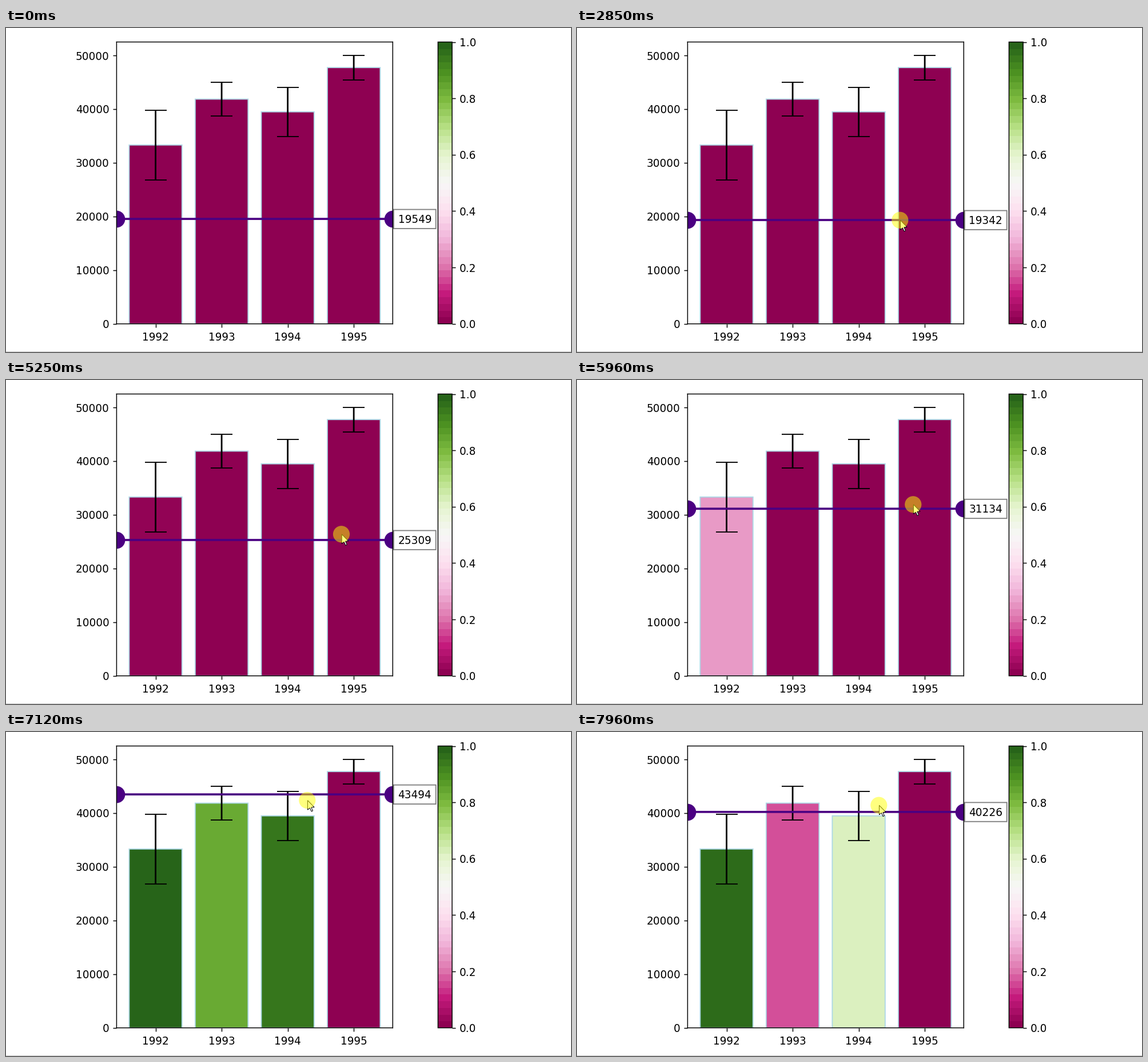
Write a matplotlib script that moves like this. It is 988 px wide and 567 px high and loops after 8 s.

```python
import math

import matplotlib.pyplot as plt
import numpy as np
from matplotlib.animation import FuncAnimation
from matplotlib.cm import ScalarMappable
from matplotlib.patches import Circle, Polygon, Rectangle

W, H, DPI = 988, 567, 128
LOOP, STEP = 8000, 40
PT = 133.4 / DPI  # the chart is drawn at 133.4 dots per inch
PX = 72 / DPI
LEFT, RIGHT, TOP, BOTTOM = 193.4, 676.3, 24.5, 517.7
BAR_LEFT, BAR_RIGHT = 755.4, 780.1
PRESS, LAG, FIRST_VALUE = 2390, 110, 19549

plt.rcParams.update({
    "font.family": "DejaVu Sans",
    "font.size": 10 * PT,
    "axes.linewidth": 0.8 * PT,
    "path.snap": False,
    "toolbar": "None",
})
for axis, pad in (("xtick", 4.1), ("ytick", 3.5)):
    plt.rcParams[f"{axis}.major.width"] = 0.8 * PT
    plt.rcParams[f"{axis}.major.size"] = 3.5 * PT
    plt.rcParams[f"{axis}.major.pad"] = pad * PT

rng = np.random.RandomState(12345)
samples = np.array([rng.normal(mean, spread, 3650) for mean, spread in
                    ((32000, 2e5), (43000, 1e5), (43500, 1.4e5), (48000, 7e4))])
MEANS = samples.mean(axis=1)
SIGMAS = samples.std(axis=1, ddof=1) / math.sqrt(samples.shape[1])
ERRORS = 1.96 * SIGMAS
Y_MAX = 1.05 * (MEANS + ERRORS).max()
GRID = Y_MAX / 369.6  # value of one mouse pixel
PER_PIXEL = Y_MAX / (BOTTOM - TOP)

# turning points: time in ms, x, y, ease-out power of the way there
TURNS = [
    (130, 946, 236, 1), (540, 730, 512, 1), (930, 562, 335, 1),
    (1100, 557, 309, 1), (1340, 566, 335, 1), (1910, 564.5, 332, 1),
    (2640, 564.5, 332, 1), (2840, 564.5, 336, 4), (4060, 560, 376, 1),
    (4560, 585, 323.5, 2), (4760, 584, 362, 2), (5150, 586, 276, 1),
    (5960, 587.5, 217.5, 1), (6775, 517.6, 74, 2), (7390, 528.6, 130, 2),
    (7700, 527.5, 164, 2), (8150, 527.5, 120, 2),
]
ARROW = np.array([(0, 0), (0, 16.5), (3.8, 13), (6.6, 19.3),
                  (9, 18.2), (6.3, 12), (11.6, 12)])


def pointer_at(t):
    for (t0, *start, _), (t1, *end, power) in zip(TURNS, TURNS[1:]):
        if t < t1:
            break
    rest = (1 - np.clip((t - t0) / (t1 - t0), 0, 1)) ** power
    return np.array(end) + (np.array(start) - end) * rest


def threshold_at(t):
    """The line trails the pressed pointer in whole mouse pixels."""
    if t < PRESS:
        return FIRST_VALUE
    value = (BOTTOM - pointer_at(t - LAG)[1]) * PER_PIXEL
    return (round(value / GRID - 0.15) + 0.15) * GRID


def below(value, mean, sigma):
    """Probability that the mean lies below the threshold."""
    return 0.5 * (1 + math.erf((value - mean) / (sigma * math.sqrt(2))))


def pixel_axes(left, right):
    return fig.add_axes([left / W, 1 - BOTTOM / H,
                         (right - left) / W, (BOTTOM - TOP) / H])


fig = plt.figure(figsize=(W / DPI, H / DPI), dpi=DPI, facecolor="white")
cmap = plt.get_cmap("PiYG")

ax = pixel_axes(LEFT, RIGHT)
bars = ax.bar(range(4), MEANS, width=0.8, edgecolor="lightblue", linewidth=PT)
ax.errorbar(range(4), MEANS, yerr=ERRORS, fmt="none", ecolor="black",
            elinewidth=1.5 * PT, capsize=10 * PT, capthick=PT)
ax.set_xticks(range(4), range(1992, 1996))
ax.set_xlim(-0.59, 3.59)
ax.set_ylim(0, Y_MAX)
line, = ax.plot(ax.get_xlim(), [0, 0], color="indigo", linewidth=2 * PT,
                marker="o", markersize=15 * PT, markeredgewidth=PT)

scale = fig.colorbar(ScalarMappable(cmap=plt.get_cmap("PiYG", 42)),
                     cax=pixel_axes(BAR_LEFT, BAR_RIGHT))
scale.set_ticks(np.linspace(0, 1, 6))

overlay = fig.add_axes([0, 0, 1, 1], zorder=5)
overlay.set(xlim=(0, W), ylim=(H, 0))
overlay.axis("off")
overlay.plot([0, W], [566.5, 566.5], color="#c8c8c8", linewidth=PX)
box = overlay.add_patch(Rectangle((677.9, 0), 73.8, 33.4, facecolor="white",
                                  edgecolor="gray", linewidth=PT))
label = overlay.text(714.8, 0, "", ha="center", va="center_baseline")
arrow = overlay.add_patch(Polygon(ARROW, facecolor="white", edgecolor="black",
                                  linewidth=PX, zorder=4))
halo = overlay.add_patch(Circle((0, 0), 14.6, facecolor="yellow", alpha=0.5,
                                linewidth=0, zorder=5))


def update(frame):
    t = frame * STEP
    value = threshold_at(t)
    y = BOTTOM - value / PER_PIXEL
    line.set_ydata([value, value])
    box.set_y(y - 16.5)
    label.set_y(y - 0.8)
    label.set_text(f"{value:.0f}")
    for bar, mean, sigma in zip(bars, MEANS, SIGMAS):
        bar.set_facecolor(cmap(below(value, mean, sigma)))

    pointer = pointer_at(t)
    arrow.set_xy(ARROW + pointer + (1, 0.5))
    arrow.set_visible(t >= TURNS[0][0])
    halo.center = tuple(pointer + 0.3)
    halo.set_visible(t >= PRESS)
    return [line, box, label, arrow, halo, *bars]


animation = FuncAnimation(fig, update, frames=LOOP // STEP, interval=STEP,
                          repeat=True, repeat_delay=0, blit=False)
plt.show()
```
